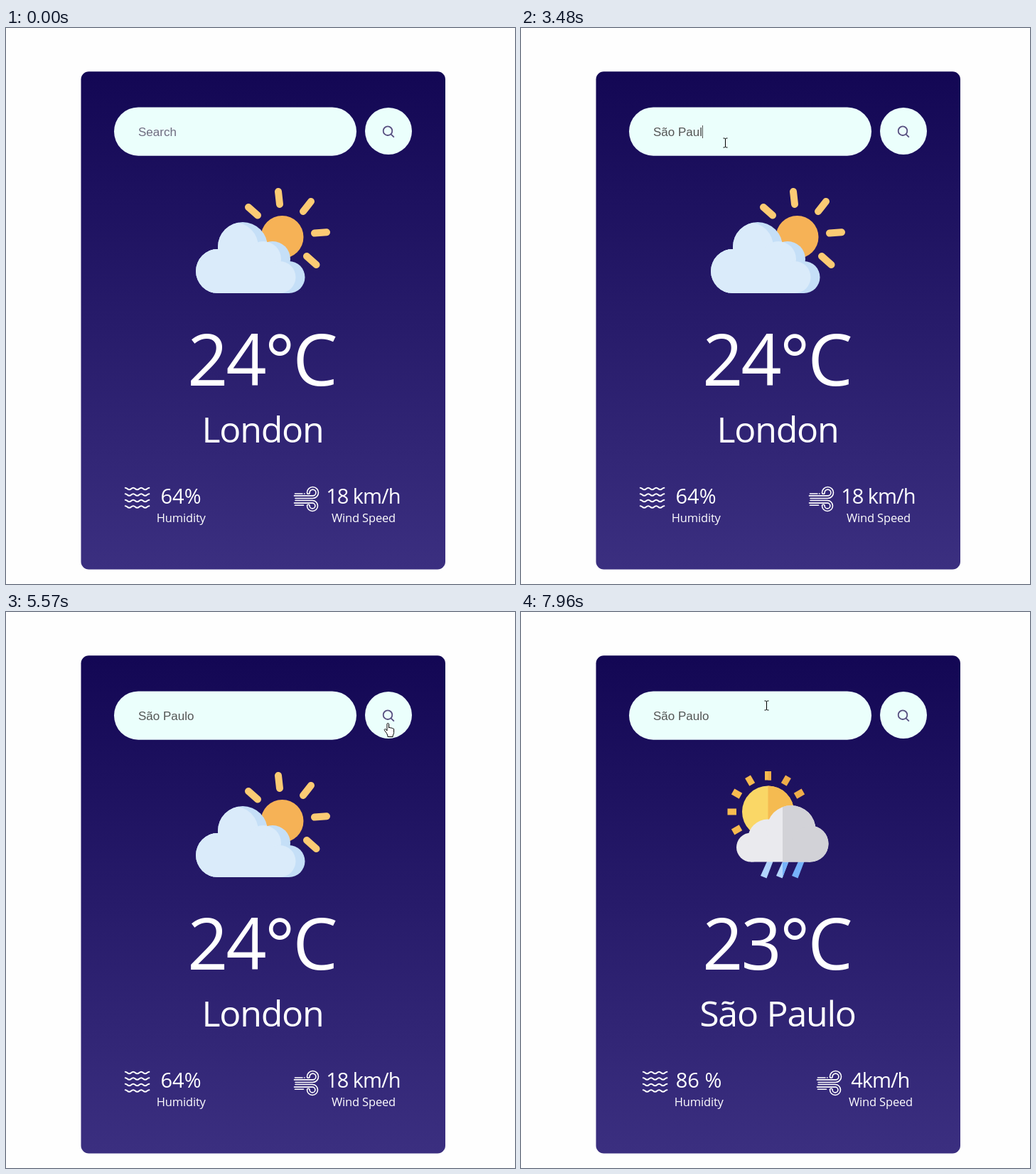
These frames come from a looping animation (716 by 782 pixels, 8000 ms). An HTML page:

```html
<!DOCTYPE html>
<html lang="en">
<head>
<meta charset="utf-8">
<title>Weather card</title>
<style>
  html, body { margin: 0; width: 100%; height: 100%; overflow: hidden; background: #fefefe; }
  svg { display: block; }
  text { white-space: pre; }
  .w { font-family: "Open Sans", "Noto Sans", sans-serif; fill: #fff; text-anchor: middle; }
  .big { font-size: 100px; letter-spacing: -.03em; }
  .city { font-size: 50px; letter-spacing: -.025em; word-spacing: 1px; }
  .num { font-size: 29px; }
  .label { font-size: 16.5px; letter-spacing: -.01em; }
  #speed { letter-spacing: -1px; }
  #query { font: 17px "Liberation Sans", Arial, sans-serif; }
  .line { fill: none; stroke: #fff; stroke-linecap: round; stroke-linejoin: round; }
</style>
</head>
<body>
<svg width="716" height="782" viewBox="0 0 716 782">
  <defs>
    <linearGradient id="night" x2="0" y2="1">
      <stop stop-color="#130754"/><stop offset="1" stop-color="#3b2f80"/>
    </linearGradient>
    <g id="cloud">
      <circle cx="298" cy="342" r="31"/>
      <circle cx="333" cy="308" r="35"/>
      <circle cx="375" cy="325" r="25"/>
      <circle cx="398" cy="350.5" r="22.5"/>
      <path d="M298 311H375L398 340V373H298z"/>
    </g>
    <clipPath id="cloudClip">
      <circle cx="298" cy="342" r="31"/>
      <circle cx="333" cy="308" r="35"/>
      <circle cx="375" cy="325" r="25"/>
      <circle cx="398" cy="350.5" r="22.5"/>
      <path d="M298 311H375L398 340V373H298z"/>
    </clipPath>
    <g id="rainCloud">
      <circle cx="323.5" cy="331" r="20.5"/>
      <circle cx="347" cy="319.5" r="28"/>
      <circle cx="380" cy="306.5" r="34.5"/>
      <circle cx="407" cy="326" r="25.5"/>
      <path d="M323.5 320H407V351.5H323.5z"/>
    </g>
    <path id="drop" d="M346 351h8.5L345.5 374.5l-8.5-3.5z"/>
    <clipPath id="sunRight"><path d="M347.5 200h150v190h-150z"/></clipPath>
    <clipPath id="cloudRight"><path d="M368 200h150v190h-150z"/></clipPath>
    <path id="arrow" d="M0 0v14.5l3.4-3.2 2.3 5.2 2.2-1-2.3-5h4.6z" fill="#fff" stroke="#000"/>
    <path id="hand" d="M-2 14L-5 10c-1-1.5 1-2.6 2-1.4L-1.5 10.5V1.2c0-1.6 2.6-1.6 2.6 0V6.5c.6-.9 2.4-.8 2.5.4 .7-.8 2.3-.5 2.4.6 .8-.6 2.1-.2 2.1 1V13c0 2-1 3-1.5 4.5V19H-.5V17.5z" fill="#fff" stroke="#000"/>
    <path id="beam" d="M-3-6.5h2l1 1 1-1h2M0-5.5v11M-3 6.5h2l1-1 1 1h2" fill="none" stroke="#000"/>
  </defs>

  <rect x="105.5" y="61.3" width="512.5" height="700.2" rx="11" fill="url(#night)"/>
  <rect x="152" y="111.5" width="341" height="68.2" rx="34.1" fill="#ebfffc"/>
  <circle cx="538" cy="145" r="33" fill="#ebfffc"/>
  <g fill="none" stroke="#574f80" stroke-width="1.8">
    <circle cx="537" cy="144.7" r="6.3"/><path d="M541.5 149.3l4.3 4.3"/>
  </g>
  <text id="query" x="186" y="152"></text>
  <path id="caret" d="M.5 137v18" stroke="#555"/>

  <g id="sunny">
    <path d="M383 230l2 18M429 244l-11 14M434 288.6l17-1.4M423 321l13.5 12M341 252l13 11.5"
      stroke="#fccb74" stroke-width="10" stroke-linecap="round"/>
    <circle cx="388.5" cy="294" r="30" fill="#f6b256"/>
    <use href="#cloud" fill="#c5dff7"/>
    <g clip-path="url(#cloudClip)"><use href="#cloud" x="-13" fill="#daebfa"/></g>
  </g>

  <g id="rainy">
    <g id="rays" fill="#f7bb50"></g>
    <circle cx="347.5" cy="281" r="36.5" fill="#fad766"/>
    <g clip-path="url(#sunRight)" fill="#f5bb51"><circle cx="347.5" cy="281" r="36.5"/></g>
    <g fill="#b3d5fd"><use href="#drop"/><use href="#drop" x="22"/></g>
    <g clip-path="url(#cloudRight)" fill="#76b2fa"><use href="#drop" x="22"/><use href="#drop" x="44"/></g>
    <use href="#rainCloud" fill="#eaeaee"/>
    <g clip-path="url(#cloudRight)"><use href="#rainCloud" fill="#d2d2d7"/></g>
  </g>

  <text id="temp" class="w big" x="359.5" y="502.5"></text>
  <text id="city" class="w city" x="361" y="583"></text>
  <g id="left">
    <g id="waves" class="line" stroke-width="2"></g>
    <text id="humidity" class="w num" x="246" y="669"></text>
    <text class="w label" x="246.3" y="695">Humidity</text>
  </g>
  <path id="wind" class="line" stroke-width="1.6" d="M407 661.5H431.5a8 8 0 1 0-8-8a1.8 1.8 0 0 0 3.6 0a4.4 4.4 0 1 1 4.4 4.4H405.5M407 664.5H431a7.5 7.5 0 1 1-7.5 7.5a1.8 1.8 0 0 1 3.6 0a3.9 3.9 0 1 0 3.9-3.9H405.5M406.5 655h10.5M419.5 655h.6M406.5 671.3h12"/>
  <g id="right">
    <text id="speed" class="w num" x="502.3" y="669"></text>
    <text class="w label" x="503" y="695">Wind Speed</text>
  </g>
  <use id="pointer"/>
</svg>
<script>
const $ = id => document.getElementById(id);
const LOOP = 8000, WORD = 'São Paulo';
const keyTimes = [1810, 2140, 2270, 2340, 2740, 3150, 3280, 3480, 3680];

// Sun rays every 30 degrees; those right of centre are darker
const ray = a => `<path d="M343 224h9v12.5h-9z" transform="rotate(${a} 347.5 281)"${a > 0 ? ' fill="#f0ae4a"' : ''}/>`;
$('rays').innerHTML = [-120, -90, -60, -30, 0, 30, 60].map(ray).join('') +
  '<path d="M347.5 224h4.5v12.5h-4.5z" fill="#f0ae4a"/>';
const wave = 'c2.8 0 2.8 2.6 5.6 2.6s2.8-2.6 5.6-2.6';
$('waves').innerHTML = [0, 1, 2, 3].map(i =>
  `<path d="M167.8 ${646.7 + i * 8.5}${wave.repeat(3)}"/>`).join('');

// Pointer positions, each held until the next: [time, x, y]
const path = [];
function glide(start, step, n, x0, y0, x1, y1) {
  for (let k = 1; k <= n; k++) {
    const e = 1 - (1 - k / n) ** 2;
    path.push([start + (k - 1) * step, x0 + (x1 - x0) * e, y0 + (y1 - y0) * e]);
  }
}
glide(200, 68, 8, 801, 950, 287.5, 161.5);
glide(4480, 66, 10, 287.5, 161.5, 537.5, 156);
path.push([7220, 611.5, 187.5], [7290, 655, 201], [7360, 681, 202], [7430, 692, 200],
  [7760, 655, 201], [7830, 540, 165], [7890, 420, 142], [7960, 345.5, 131.5]);

function pointerKind(x, y) {
  if (Math.hypot(x - 538, y - 145) < 33) return '#hand';
  return x > 152 && x < 493 && y > 112 && y < 180 ? '#beam' : '#arrow';
}

function drawPointer(t) {
  const at = path.filter(p => p[0] <= t).pop();
  $('pointer').style.display = at ? '' : 'none';
  if (!at) return;
  const x = Math.floor(at[1]) + .5, y = Math.floor(at[2]) + .5;
  $('pointer').setAttribute('href', pointerKind(x, y));
  $('pointer').setAttribute('transform', `translate(${x} ${y})`);
}

function drawQuery(t) {
  const n = keyTimes.filter(k => k <= t).length;
  const query = $('query');
  query.textContent = n ? WORD.slice(0, n) : 'Search';
  query.setAttribute('fill', n ? '#555' : '#6f6c80');
  const since = t - (n ? keyTimes[n - 1] : 680);
  const on = since >= 0 && t < 5300 && Math.floor(since / 530) % 2 === 0;
  const x = 186 + (n ? query.getComputedTextLength() : 0);
  $('caret').style.display = on ? '' : 'none';
  $('caret').setAttribute('transform', `translate(${Math.floor(x)} 0)`);
}

function drawWeather(t) {
  const found = t >= 6300, rain = t >= 6360;
  $('temp').textContent = found ? '23°C' : '24°C';
  $('city').textContent = found ? WORD : 'London';
  $('humidity').textContent = found ? '86 %' : '64%';
  $('speed').textContent = found ? '4km/h' : '18 km/h';
  const shift = (id, dx) => $(id).setAttribute('transform', `translate(${found ? dx : 0} 0)`);
  shift('left', 4);
  shift('wind', 11);
  shift('right', 3);
  $('sunny').style.display = rain ? 'none' : '';
  $('rainy').style.display = rain ? '' : 'none';
}

const begin = performance.now();
function frame() {
  const t = (performance.now() - begin) % LOOP;
  drawQuery(t);
  drawWeather(t);
  drawPointer(t);
  requestAnimationFrame(frame);
}
frame();
</script>
</body>
</html>
```
